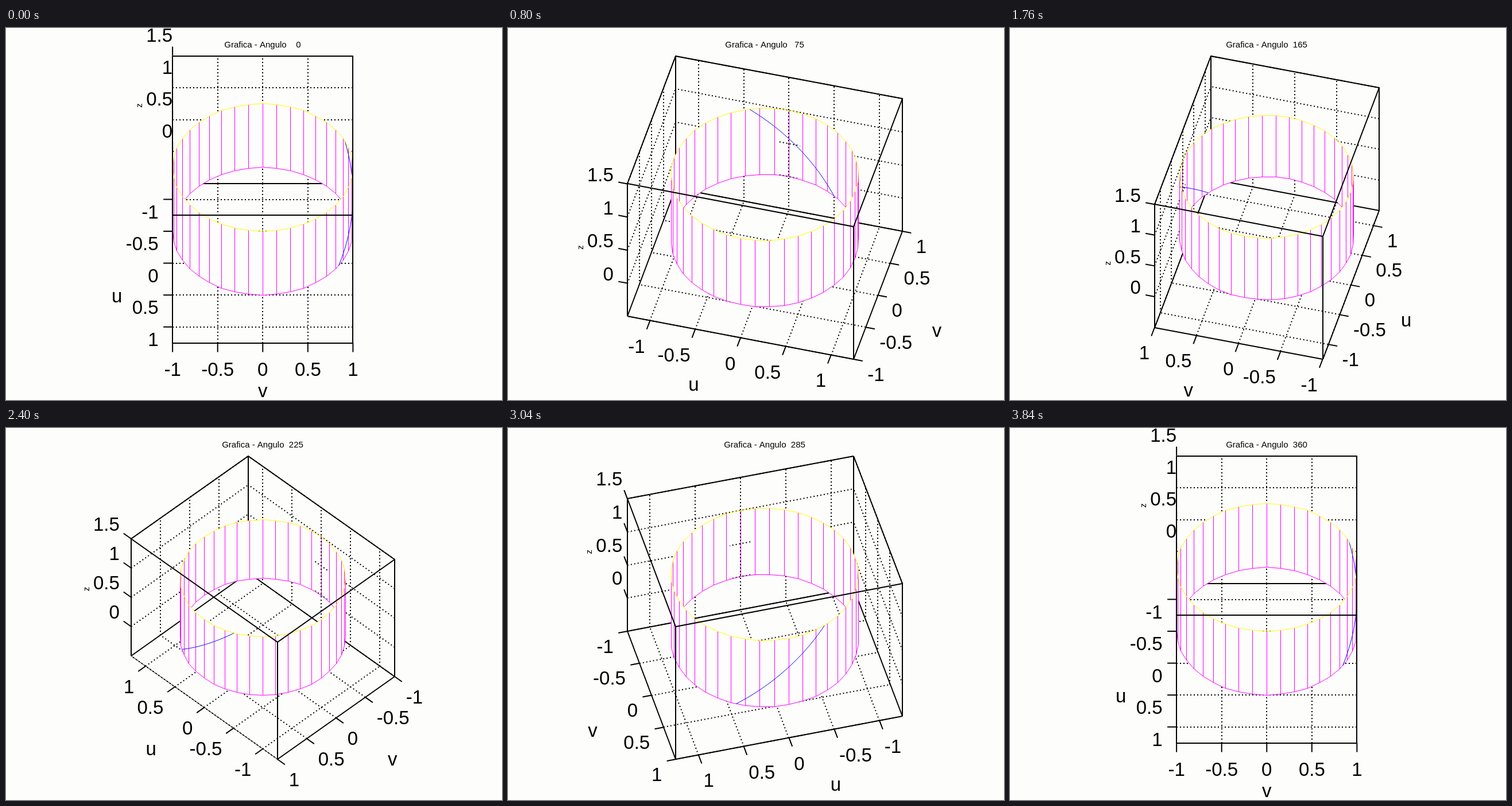
These frames come from a looping animation (864x648 px, 4000 ms). An HTML page with a canvas:

```html
<!DOCTYPE html>
<html lang="es">
<head>
<meta charset="utf-8">
<title>Grafica</title>
<style>
  html, body { margin: 0; width: 100%; height: 100%; overflow: hidden; background: #fdfdfc; }
  canvas { display: block; }
</style>
</head>
<body>
<canvas id="stage" width="864" height="648"></canvas>
<script>
const ctx = document.getElementById('stage').getContext('2d');
const BACKGROUND = '#fdfdfc', FONT = '"Liberation Sans", Arial, sans-serif';
const STEP_MS = 160, STEPS = 25, STEP_DEG = 15;
const TILT = Math.SQRT1_2, CENTER_X = 447.25, TOP = 48.5;
const U = 1.25, V = 1, Z_MIN = -0.5, Z_MAX = 1.5;
const TICKS = [-1, -0.5, 0, 0.5, 1], Z_TICKS = [0, 0.5, 1, 1.5];
const FACETS = 40, TICK = 16, LABEL_GAP = 24.5;

function path(points, closed) {
  ctx.beginPath();
  points.forEach(([x, y]) => ctx.lineTo(x, y));
  if (closed) ctx.closePath();
}

function line(points, color = '#000', width = 2) {
  path(points);
  ctx.strokeStyle = color;
  ctx.lineWidth = width;
  ctx.stroke();
}

function text(string, x, y, size, align) {
  ctx.font = `${size}px ${FONT}`;
  ctx.textAlign = align;
  ctx.fillStyle = '#000';
  ctx.fillText(string, x, y);
}

function direction([x0, y0], [x1, y1]) {
  const length = Math.hypot(x1 - x0, y1 - y0);
  return [(x1 - x0) / length, (y1 - y0) / length];
}

function draw(degrees) {
  const theta = degrees * Math.PI / 180;
  const sin = Math.sin(theta), cos = Math.cos(theta);
  const bottom = degrees % 90 ? 577 : 548.5;
  const scale = (bottom - TOP) / (TILT * (2 * U * Math.abs(cos) + 2 * V * Math.abs(sin) + Z_MAX - Z_MIN));

  const project = (u, v, z) => [
    CENTER_X + scale * (u * sin + v * cos),
    (TOP + bottom) / 2 + scale * TILT * (u * cos - v * sin - z + 0.5)
  ];
  const box = (u, v, z) => project(u, v, z).map(Math.round);
  const onCylinder = (t, z) => project(Math.cos(t), Math.sin(t), z).map(c => Math.floor(c) + 0.5);
  const isBack = t => Math.cos(theta + t) < 0;

  // A tiny turn decides which corners count as back and left when edges line up.
  const turned = theta + 1e-4;
  const backU = Math.cos(turned) > 0 ? -U : U, frontU = -backU;
  const backV = Math.sin(turned) > 0 ? V : -V, frontV = -backV;
  const across = (u, v) => u * Math.sin(turned) + v * Math.cos(turned);
  const uIsLeft = across(backU, frontV) < across(frontU, backV);
  const left = uIsLeft ? [backU, frontV] : [frontU, backV];

  function grid() {
    ctx.setLineDash([2, 4]);
    for (const u of TICKS) {
      line([box(u, frontV, Z_MIN), box(u, backV, Z_MIN)]);
      line([box(u, backV, Z_MIN), box(u, backV, Z_MAX)]);
    }
    for (const v of TICKS) {
      line([box(frontU, v, Z_MIN), box(backU, v, Z_MIN)]);
      line([box(backU, v, Z_MIN), box(backU, v, Z_MAX)]);
    }
    for (const z of Z_TICKS) {
      line([box(frontU, backV, z), box(backU, backV, z)]);
      line([box(backU, frontV, z), box(backU, backV, z)]);
    }
    ctx.setLineDash([]);
  }

  function backEdges() {
    const corner = box(backU, backV, Z_MIN);
    line([corner, box(frontU, backV, Z_MIN)]);
    line([corner, box(backU, frontV, Z_MIN)]);
    line([corner, box(backU, backV, Z_MAX)]);
  }

  function frontEdges() {
    line([[-U, -V], [U, -V], [U, V], [-U, V], [-U, -V]].map(([u, v]) => box(u, v, Z_MAX)));
    for (const [u, v] of [[frontU, frontV], [frontU, backV], [backU, frontV]])
      line([box(u, v, Z_MIN), box(u, v, Z_MAX)]);
    const front = box(frontU, frontV, Z_MIN);
    const leftWidth = degrees % 180 === 45 ? 1 : 2;
    line([front, box(backU, frontV, Z_MIN)], '#000', uIsLeft ? leftWidth : 2);
    line([front, box(frontU, backV, Z_MIN)], '#000', uIsLeft ? 2 : leftWidth);
  }

  function wall(back) {
    const step = 2 * Math.PI / FACETS;
    for (let i = 0; i < FACETS; i++) {
      const a = i * step, b = a + step;
      if (isBack(a + step / 2) !== back) continue;
      const corners = [onCylinder(a, 1), onCylinder(a, 0), onCylinder(b, 0), onCylinder(b, 1)];
      path(corners, true);
      ctx.fillStyle = BACKGROUND;
      ctx.fill();
      line(corners, '#f0f', 1);
    }
  }

  function helix(back) {
    const points = [];
    for (let t = 1; t <= 2.001; t += 0.02)
      if (isBack(t) === back) points.push(project(Math.cos(t), Math.sin(t), t - 1));
    line(points, '#00f', 1);
  }

  // The cylinder touches the side wall, so the grid shows through along that strip.
  function touchingGrid() {
    const strip = 0.12;
    ctx.save();
    path([[-strip, 0], [strip, 0], [strip, 1], [-strip, 1]].map(([u, z]) => project(u, backV, z)), true);
    ctx.clip();
    grid();
    ctx.restore();
  }

  function rim() {
    const points = [];
    for (let i = 0; i <= FACETS; i++) points.push(onCylinder(i * 2 * Math.PI / FACETS, 1));
    line(points, '#ff0', 1);
  }

  function tick([x, y], [dx, dy]) {
    line([[x, y], [x + dx * TICK, y + dy * TICK]]);
  }

  function floorAxis(name, pointAt, dir) {
    const [dx, dy] = dir;
    const side = Math.abs(dx) < 0.01 ? 0 : Math.sign(dx);
    const align = side < 0 ? 'right' : side > 0 ? 'left' : 'center';
    for (const value of TICKS) {
      const point = pointAt(value);
      tick(point, dir);
      text(value, point[0] + dx * LABEL_GAP, point[1] + dy * LABEL_GAP + 33, 33, align);
    }
    const [x, y] = pointAt(0);
    const reach = (name === 'v' ? 79 : 73) + 24 * Math.abs(dx);
    text(name, x + side * reach, y + 68 + 26 * dy, 33, 'center');
  }

  function zAxis() {
    const dir = direction(project(frontU, frontV, 0), project(...left, 0));
    const [dx, dy] = dir;
    for (const z of Z_TICKS) {
      const point = project(...left, z);
      tick(point, dir);
      text(z.toString(), point[0] + dx * LABEL_GAP, point[1] + dy * LABEL_GAP, 33, 'right');
    }
    const [x, y] = project(...left, 0.5);
    ctx.save();
    ctx.translate(x - 57 + 24.3 * dx, y + 24.5 * dy);
    ctx.rotate(-Math.PI / 2);
    text('z', 0, 4, 15, 'center');
    ctx.restore();
  }

  ctx.fillStyle = BACKGROUND;
  ctx.fillRect(0, 0, 864, 648);
  grid();
  backEdges();
  wall(true);
  touchingGrid();
  helix(true);
  wall(false);
  helix(false);
  rim();
  frontEdges();

  const front = project(frontU, frontV, Z_MIN);
  floorAxis('u', u => project(u, frontV, Z_MIN), direction(project(frontU, backV, Z_MIN), front));
  floorAxis('v', v => project(frontU, v, Z_MIN), direction(project(backU, frontV, Z_MIN), front));
  zAxis();
  text('Grafica - Angulo' + String(degrees).padStart(5), 447, 34, 15, 'center');
}

function play() {
  draw(Math.floor(performance.now() / STEP_MS) % STEPS * STEP_DEG);
  requestAnimationFrame(play);
}
play();
</script>
</body>
</html>
```
